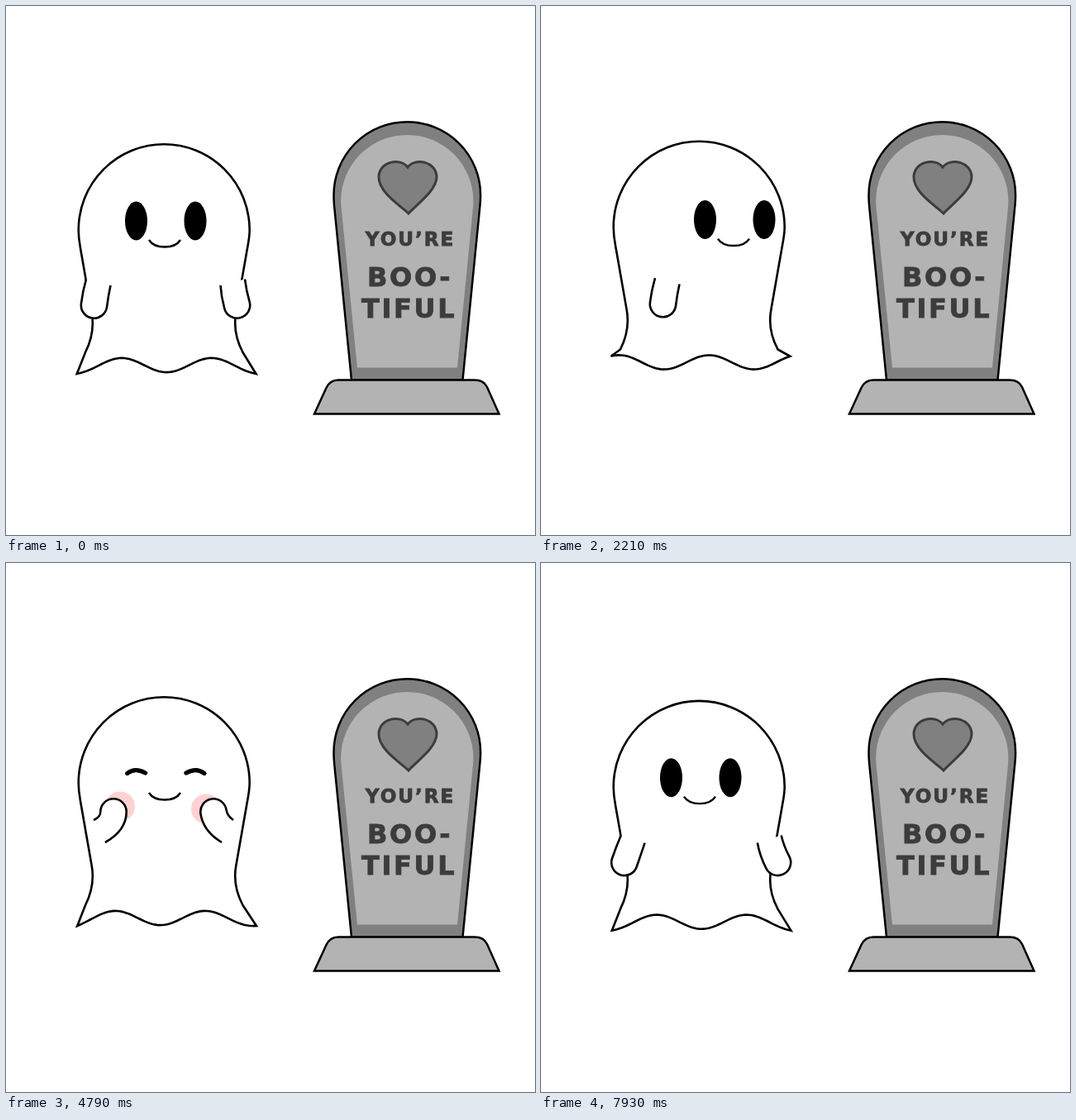
These frames come from a looping animation (640 by 640 pixels, 8 s). An HTML page:

```html
<!DOCTYPE html>
<html lang="en">
<head>
<meta charset="utf-8">
<title>Ghost and gravestone</title>
<style>
  html, body { margin: 0; width: 100%; height: 100%; overflow: hidden; background: #fff; }
  svg { display: block; width: 100%; height: 100%; }
  .line { fill: none; stroke: #000; stroke-width: 2.6; }
  .arm { fill: #fff; stroke-linejoin: round; }
  .blush { fill: #ffd2d2; }
  text {
    font-family: "DejaVu Sans", sans-serif; font-weight: bold; letter-spacing: .083em;
    fill: #3c3c3c; stroke: #3c3c3c; stroke-width: .8;
  }
</style>
</head>
<body>
<svg viewBox="0 0 640 640">
  <g stroke="#000" stroke-width="2.5">
    <path fill="#808080" d="M418 452.5 L397 241 Q396.5 235 396.5 229 A88.8 88.8 0 0 1 574.1 229 Q574.1 235 573.5 241 L552.5 452.5 Z"/>
    <path fill="#b3b3b3" stroke="none" d="M425 437.5 L405.8 246 Q405.2 241 405.2 236 A80.1 80.1 0 0 1 565.4 236 Q565.4 241 564.8 246 L546 437.5 Z"/>
    <path fill="#b3b3b3" d="M373 493.5 L387.5 462 Q392 452.5 402 452.5 H567 Q578 452.5 582 461 L596.5 493.5 Z"/>
  </g>
  <path fill="#808080" stroke="#3c3c3c" stroke-width="3" d="M487 251 C478 242 451 226 451 207 C451 188 477 183 486 195 C495 183 521 188 521 207 C521 223 496 241 487 251 Z"/>
  <text x="434.8" y="290" font-size="23.2">YOU’RE</text>
  <text x="437" y="339" font-size="32">BOO-</text>
  <text x="430" y="377" font-size="32">TIFUL</text>

  <g id="ghost">
    <path id="body" class="line"/>
    <g id="blush">
      <circle class="blush" cx="138" cy="299.5" r="18"/>
      <circle class="blush" cx="242" cy="302.5" r="18"/>
    </g>
    <g id="face">
      <g id="open">
        <ellipse id="eyeL" cx="157.5" cy="260" rx="13.5" ry="23.5"/>
        <ellipse id="eyeR" cx="229" cy="260" rx="13.5" ry="23.5"/>
      </g>
      <path id="closed" fill="none" stroke="#000" stroke-width="5.4" stroke-linecap="round"
        d="M146.8 259.5 Q156 252 168.5 259 M218 259 Q230.5 252 239.8 259.5"/>
      <path class="line" style="stroke-width:2.4" d="M173 283 C180 294.3 204 294.3 211 283"/>
    </g>
    <path id="armL" class="line arm"/>
    <path id="armR" class="line arm"/>
  </g>
</svg>
<script>
const LOOP = 8000, BOB = 2690, RIPPLE = 1560, HAND = 15.7;
const $ = id => document.getElementById(id);
const clamp = u => Math.min(1, Math.max(0, u));
const mix = (a, b, u) => a + (b - a) * u;

// Eased 0 to 1 between two times.
const ramp = (t, from, to) => (1 - Math.cos(Math.PI * clamp((t - from) / (to - from)))) / 2;

// Left arm poses; the right arm mirrors x as span - x.
const pose = (sx, sy, hx, hy, angle, ex, ey, span) => ({ sx, sy, hx, hy, angle, ex, ey, span });
const rest = pose(97, 330.5, 106.5, 362, 97, 126.5, 338, 386);
const out = pose(101, 267.5, 67.5, 289.5, 166, 101, 297, 388);
const cheek = pose(120, 343, 130, 306, 270, 106, 316, 381);
const swing = pose(96.5, 329, 94.5, 363.5, 123, 124.5, 340, 389);

const blend = (a, b, u) => Object.fromEntries(Object.keys(a).map(k => [k, mix(a[k], b[k], u)]));

function armPose(t) {
  let p = blend(rest, out, ramp(t, 3400, 3950));
  p = blend(p, cheek, ramp(t, 4010, 4300));
  p = blend(p, swing, ramp(t, 7480, 7790));
  return blend(p, rest, ramp(t, 7790, 8060));
}

// Shoulder, half circle round the hand, and back to the body.
function armPath(p, tilt, mapX, rx, sweep) {
  const a = (p.angle + tilt) * Math.PI / 180, ux = Math.cos(a), uy = Math.sin(a);
  const at = (x, y) => `${mapX(x)} ${y} `;
  const edge = side => [p.hx - side * HAND * uy, p.hy + side * HAND * ux];
  const handle = ([x, y], ox, oy) => {
    const k = Math.hypot(x - ox, y - oy) / 2;
    return at(x - ux * k, y - uy * k);
  };
  const e1 = edge(1), e2 = edge(-1);
  return "M" + at(p.sx, p.sy) + "Q" + handle(e1, p.sx, p.sy) + at(...e1) +
    `A${rx} ${HAND} 0 0 ${sweep} ` + at(...e2) + "Q" + handle(e2, p.ex, p.ey) + at(p.ex, p.ey);
}

// Body outline; the hem is a wave that runs to the left.
function bodyPath(c) {
  const a = 2 * Math.PI * c, len = 108.7;
  const x0 = 84.8 + 1.7 * Math.sin(a + 0.6), x1 = x0 + 216.7;
  const tip = 435.5 + 9.5 * Math.cos(a);
  const wave = x => 434.5 - 8.6 * Math.cos(2 * Math.PI * (x - 140) / len + a);
  let d = `M${x0} ${tip}L96 419C104 403 107 388 103.5 370L90 293C88.5 285 87.7 279 87.7 271` +
    `A103.5 103.8 0 0 1 294.7 271C294.7 279 293.5 285 292 293L278.5 370C275 388 278 403 286.5 419L${x1} ${tip}`;
  const n = 72;
  for (let i = 1; i < n; i++) {
    const x = mix(x1, x0, i / n);
    const y = wave(x) + (tip - wave(x0)) * Math.exp((x0 - x) / 9) + (tip - wave(x1)) * Math.exp((x - x1) / 9);
    d += `L${x.toFixed(2)} ${y.toFixed(2)}`;
  }
  return d + "Z";
}

const shift = (el, x, y) => el.setAttribute("transform", `translate(${x} ${y})`);
const show = (el, on) => { el.style.display = on ? "" : "none"; };

function draw(t) {
  const bob = -6.2 * (1 - Math.cos(2 * Math.PI * t / BOB));
  const dx = 41 * (ramp(t, 300, 1350) - ramp(t, 2480, 4300)), dy = dx / 20;
  const lift = -42 * (ramp(t, 2880, 3900) - ramp(t, 4000, 4350));
  shift($("ghost"), 0, bob);
  shift($("face"), dx, dy + lift);
  $("body").setAttribute("d", bodyPath(Math.min(5, t / RIPPLE)));

  const open = 1 - ramp(t, 4040, 4280) + ramp(t, 7450, 7700);
  show($("open"), open > 0.12);
  show($("closed"), open <= 0.12);
  for (const id of ["eyeL", "eyeR"]) $(id).setAttribute("ry", 23.5 * open);
  $("blush").style.opacity = ramp(t, 4150, 4380) - ramp(t, 7380, 7600);

  const p = armPose(t);
  $("armL").setAttribute("d", armPath(p, 0, x => x, HAND, 0));
  shift($("armL"), dx, dy);

  // The far arm narrows away as the ghost turns.
  const wide = clamp((20 - dx) / 14);
  $("armR").setAttribute("d", armPath(p, 9, x => mix(284, p.span - x, wide), HAND * wide, 1));
  show($("armR"), wide > 0.02);
}

const start = performance.now();
function frame() {
  draw((performance.now() - start) % LOOP);
  requestAnimationFrame(frame);
}
frame();
</script>
</body>
</html>
```
